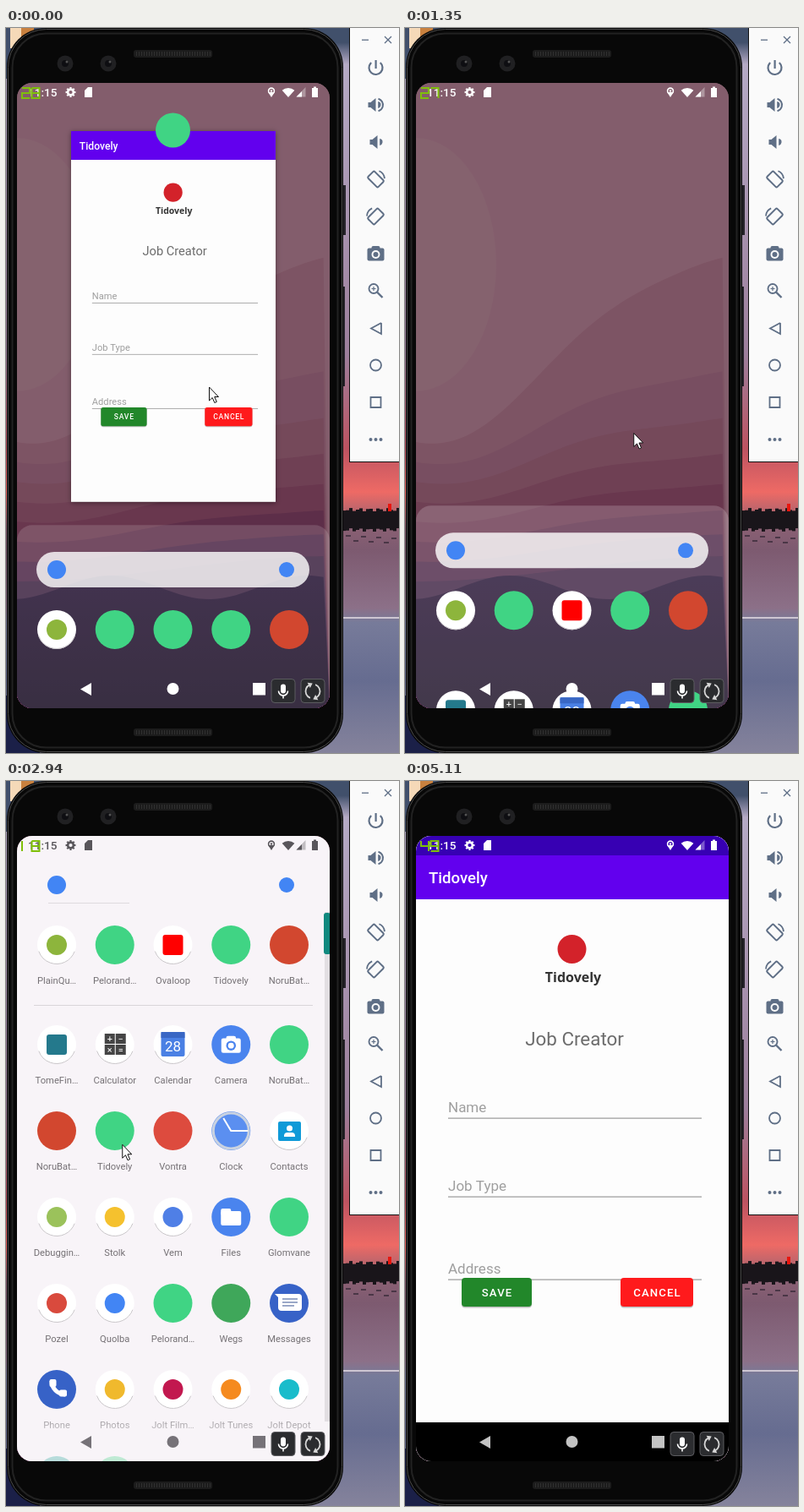
These frames come from a looping animation (465x858 px, 8 s). An HTML page with a canvas:

```html
<!DOCTYPE html>
<html lang="en">
<head>
<meta charset="utf-8">
<title>Phone emulator</title>
<style>
html, body { margin: 0; width: 465px; height: 858px; overflow: hidden; background: #000; }
canvas { display: block; }
</style>
</head>
<body>
<canvas id="stage" width="465" height="858"></canvas>
<script>
const c = document.getElementById('stage').getContext('2d');
const LOOP = 8000, TICK = 134.5;
const APP_NAME = 'Tidovely';
const GREEN = '#40d484', RED = '#d2472f', BLUE = '#4285f4', ROYAL = '#3762c7', WHITE = '#fff';

const clamp = v => Math.max(0, Math.min(1, v));
const mix = (a, b, p) => a + (b - a) * p;
const ramp = (t, from, to) => clamp((t - from) / (to - from));
const easeOut = u => 1 - (1 - u) ** 3;
const smooth = u => u * u * (3 - 2 * u);

// Drawing helpers
function rect(x, y, w, h, fill) { c.fillStyle = fill; c.fillRect(x, y, w, h); }
function round(x, y, w, h, r, fill, stroke, width = 1) {
  c.beginPath(); c.roundRect(x, y, w, h, r);
  if (fill) { c.fillStyle = fill; c.fill(); }
  if (stroke) { c.strokeStyle = stroke; c.lineWidth = width; c.stroke(); }
}
function disc(x, y, r, fill) { c.beginPath(); c.arc(x, y, r, 0, 7); c.fillStyle = fill; c.fill(); }
function ring(x, y, r, color, width, from = 0, to = 7) {
  c.beginPath(); c.arc(x, y, r, from, to); c.strokeStyle = color; c.lineWidth = width; c.stroke();
}
function poly(points, fill) { c.beginPath(); points.forEach(p => c.lineTo(...p)); c.closePath(); c.fillStyle = fill; c.fill(); }
function line(points, color, width) {
  c.beginPath(); points.forEach(p => c.lineTo(...p)); c.strokeStyle = color; c.lineWidth = width; c.stroke();
}
function text(s, x, y, size, fill, align = 'left', weight = 400, family = 'Roboto') {
  c.font = `${weight} ${size}px ${family}, sans-serif`;
  c.fillStyle = fill; c.textAlign = align; c.fillText(s, x, y);
}
function layer(alpha, draw) {
  if (alpha <= 0) return;
  c.save(); c.globalAlpha *= alpha; draw(); c.restore();
}
function place(x, y, angle, draw) { c.save(); c.translate(x, y); c.rotate(angle); draw(); c.restore(); }
function gradient(y0, y1, stops) {
  const g = c.createLinearGradient(0, y0, 0, y1);
  stops.forEach(([p, color]) => g.addColorStop(p, color));
  return g;
}

// Icons, drawn around the origin
const icons = {
  power(ink) { ring(0, 0, 8, ink, 2.2, -.85, Math.PI + .85); rect(-1, -9, 2.2, 10, ink); },
  speaker(ink, waves) {
    const left = waves > 1 ? -9 : -7;
    rect(left, -3, 5, 6, ink);
    poly([[left + 3, -3], [left + 9, -8], [left + 9, 8], [left + 3, 3]], ink);
    c.beginPath(); c.arc(left + 11, 0, 4, -1.4, 1.4); c.fillStyle = ink; c.fill();
    if (waves > 1) ring(left + 10, 0, 7.5, ink, 2, -1.3, 1.3);
  },
  rotate(ink, side) {
    place(0, 0, side * Math.PI / 4, () => {
      round(-5.5, -8.5, 11, 17, 1.5, null, ink, 2);
      ring(0, 0, 10.5, ink, 1.8, side < 0 ? -.4 : 2.4, side < 0 ? .7 : 3.5);
    });
  },
  camera(ink, hole) {
    round(-10, -6.5, 20, 15, 2, ink); round(-5, -9, 10, 5, 2, ink);
    disc(0, 1, 5, hole); disc(0, 1, 3, ink);
  },
  zoom(ink) {
    ring(-2.5, -2.5, 5.5, ink, 1.9); line([[1.500, 1.500], [8, 8]], ink, 2.4);
    line([[-5, -2.5], [0, -2.5]], ink, 1.2); line([[-2.5, -5], [-2.5, 0]], ink, 1.2);
  },
  handset() {
    ring(10, -10, 16, WHITE, 5, Math.PI / 2, Math.PI);
    round(-8.5, -12, 8, 9, 2, WHITE); round(3, .5, 9, 8, 2, WHITE);
  },
  chat() {
    round(-13, -11, 28, 20, 4, WHITE); poly([[-17, -11], [-8, -11], [-8, -2]], WHITE);
    for (let i = 0; i < 3; i++) rect(-8, -6 + 4 * i, i > 1 ? 14 : 18, 2, '#9aa8c8');
  },
  calculator() {
    [...'+−×='].forEach((s, i) => {
      const x = i % 2 * 13 - 12, y = (i >> 1) * 13 - 13;
      rect(x, y, 12, 12, '#454545'); text(s, x + 6, y + 10, 11, WHITE, 'center');
    });
  },
  calendar() {
    round(-14, -15, 28, 29, 2, '#4a80e4'); rect(-14, -15, 28, 7, '#3967c4');
    text('28', 0, 8, 17, WHITE, 'center');
  },
  photo() { c.scale(1.15, 1.15); icons.camera(WHITE, '#4a84ee'); },
  clock() { ring(0, 0, 21, '#c9d2e0', 3); line([[-9, -15], [0, 0], [20, 0]], WHITE, 2); },
  contacts() {
    round(-13, -11, 27, 23, 2, '#0f9ad8'); disc(.5, -3, 3.5, WHITE); round(-6, 2, 13, 5, [4, 4, 0, 0], WHITE);
  },
  folder() { round(-12, -10, 12, 8, 2, WHITE); round(-12, -7, 24, 17, 2, WHITE); },
  gear(ink) {
    ring(0, 0, 3.4, ink, 2.6);
    for (let a = 0; a < 6; a += Math.PI / 4) ring(0, 0, 5, ink, 2, a - .2, a + .2);
  },
  mic(ink) {
    round(-3, -8, 6, 11, 3, ink); ring(0, 0, 5.5, ink, 1.6, 0, Math.PI); rect(-.8, 5, 1.6, 4, ink);
  },
  pin(ink) { ring(0, -1.5, 3.4, ink, 1.6); poly([[-3.8, 0], [3.8, 0], [0, 6]], ink); disc(0, -1.5, 1.2, ink); },
  wifi(ink) { c.beginPath(); c.moveTo(0, 6); c.arc(0, 6, 11, -2.3, -.84); c.fillStyle = ink; c.fill(); }
};
const icon = (name, x, y, ...args) => place(x, y, 0, () => icons[name](...args));

const dot = color => () => disc(0, 0, 12, color);
const square = color => () => round(-12, -12, 24, 24, 3, color);
const APPS = [
  ['PlainQu…', WHITE, dot('#8db53c')], ['Pelorand…', GREEN], ['Ovaloop', WHITE, square('#f00')], [APP_NAME, GREEN], ['NoruBat…', RED],
  ['TomeFin…', WHITE, square('#24798c')], ['Calculator', WHITE, icons.calculator], ['Calendar', WHITE, icons.calendar], ['Camera', '#4a84ee', icons.photo], ['NoruBat…', GREEN],
  ['NoruBat…', RED], [APP_NAME, GREEN], ['Vontra', '#dd4b3e'], ['Clock', '#5b8ff0', icons.clock], ['Contacts', WHITE, icons.contacts],
  ['Debuggin…', WHITE, dot('#9bc25b')], ['Stolk', WHITE, dot('#f5c12e')], ['Vem', WHITE, dot('#4f7fe6')], ['Files', '#4a84ee', icons.folder], ['Glomvane', GREEN],
  ['Pozel', WHITE, dot('#d94a3d')], ['Quolba', WHITE, dot(BLUE)], ['Pelorand…', GREEN], ['Wegs', '#3fa75a'], ['Messages', ROYAL, icons.chat],
  ['Phone', ROYAL, icons.handset], ['Photos', WHITE, dot('#f0b92d')], ['Jolt Film…', WHITE, dot('#c2184f')], ['Jolt Tunes', WHITE, dot('#f58a1f')], ['Jolt Depot', WHITE, dot('#19bccb')],
  ['', '#26a69a'], ['', GREEN]
];
const named = name => APPS.find(app => app[0] === name);
const SUGGESTED = [APPS[0], APPS[1], APPS[3], APPS[3], APPS[4]];
const HOME_DOCK = ['Phone', 'Messages', 'Jolt Depot', 'Vontra'].map(named);

const column = i => 60 + 68.75 * (i % 5);
function appIcon([, color, mark], x, y) {
  disc(x, y, 23, color);
  if (color === WHITE) ring(x, y, 22.5, '#c9c5c9', 1, .35, 2.8);
  if (mark) place(x, y, 0, mark);
}
function searchMarks(y) { disc(60, y, 11, BLUE); disc(332, y, 9, BLUE); }

function backdrop() {
  rect(0, 0, 465, 858, gradient(0, 858, [[0, '#41506b'], [.02, '#41506b'], [.05, '#b5aac5'], [.45, '#9d7f9c'], [.58, '#bd5361'],
    [.64, '#ee6a65'], [.69, '#8a6073'], [.72, '#7d5a70'], [.8, '#8c7088'], [.82, '#777b9a'], [.9, '#666c90'], [1, '#85839c']]));
  rect(398, 697, 67, 2, '#cdc6d2');
  rect(0, 0, 40, 60, '#41506b'); rect(5, 0, 13, 24, '#f5d9b8'); rect(18, 0, 15, 12, '#c9813f');
  rect(0, 790, 40, 68, '#1b2048');
  for (let x = 398; x < 465; x += 4) rect(x, 570 + 2 * Math.sin(x * 7.3), 4, 24, '#19151a');
  for (let i = 0; i < 7; i++) rect(402 + i * 9, 600 + i * 17 % 11, 6, 2, '#4a3646');
  rect(452, 563, 4, 9, '#e8160e');
}

function device() {
  rect(398, 186, 4, 59, '#252329'); rect(398, 306, 3, 118, '#252329');
  round(1, 0, 398, 858, 46, '#080808');
  round(2.5, 1.5, 395, 855, 45, null, '#4a4a4a');
  round(7.5, 6.5, 385, 845, 40, null, '#222', 2);
  for (const y of [26, 829]) {
    round(151, y, 93, 9, 3, '#1c1c1c');
    for (let x = 154; x < 242; x += 3) rect(x, y + 2, 1, 5, '#303030');
  }
  for (const x of [70, 121]) { disc(x, 42, 9.5, '#202022'); disc(x, 42, 4, '#0e0e12'); disc(x + 2, 40, 1.5, '#555'); }
}

function toolbar() {
  const ink = '#5f6f86', x = 437.5, row = i => 47 + 44 * i;
  rect(406, 0, 59, 514, '#111'); rect(407, 0, 58, 513, '#fafafa');
  rect(421, 13.5, 8, 1.3, ink);
  for (const s of [-4, 4]) line([[452 - s, 10], [452 + s, 18]], ink, 1.3);
  icon('power', x, row(0), ink);
  icon('speaker', x, row(1), ink, 2); icon('speaker', x, row(2), ink, 1);
  icon('rotate', x, row(3), ink, -1); icon('rotate', x, row(4), ink, 1);
  icon('camera', x, row(5), ink, '#fafafa'); icon('zoom', x, row(6), ink);
  line([[444, 349], [444, 362], [432, 355.5], [444, 349]], ink, 1.8);
  ring(x, row(8), 6.5, ink, 1.8);
  round(431.5, 437, 12, 12, 0, null, ink, 1.8);
  for (const d of [-6, 0, 6]) disc(x + d, row(10), 2, ink);
}

function hill(color, height) {
  c.beginPath(); c.moveTo(13, 805);
  for (let u = 0; u <= 1; u += .02) c.lineTo(13 + 370 * u, height(u));
  c.lineTo(383, 805); c.fillStyle = color; c.fill();
}
function wallpaper() {
  rect(13, 65, 370, 740, '#f4a7c5');
  c.beginPath(); c.ellipse(13, 280, 95, 150, 0, 0, 7); c.fillStyle = '#f7b1ca'; c.fill();
  const shades = ['#e896b5', '#de8ab0', '#d87ea2', '#cc6c96', '#bf5a8a', '#a7497e', '#85397a', '#65306f'];
  shades.forEach((shade, i) => {
    const p = i / (shades.length - 1);
    hill(shade, u => mix(490 + 165 * p, 267 + 358 * Math.sqrt(p), smooth(u)) + 8 * (1 - p) * Math.sin(9 * u));
  });
  hill(gradient(655, 805, [[0, '#310c4e'], [1, '#1b0430']]), u => 662 - 14 * Math.cos(10 * (u - .3)));
}

function home() {
  rect(13, 65, 370, 73, 'rgba(180,150,185,.3)');
  rect(13, 65, 370, 40, gradient(65, 105, [[0, 'rgba(40,25,40,.45)'], [1, 'rgba(40,25,40,0)']]));
  c.save(); c.shadowColor = 'rgba(0,0,0,.45)'; c.shadowBlur = 4; c.shadowOffsetY = 1;
  text('Sunday, Mar 28', 197.5, 155, 22.4, WHITE, 'center'); c.restore();
  HOME_DOCK.forEach((app, i) => appIcon(app, column(i), 651));
  round(36, 710, 323, 42, 21, '#d3cdd8');
  searchMarks(731);
}

// App drawer; `off` is its distance below the fully open position.
function sheet(off, apps) {
  const open = clamp(1 - off / 400);
  layer(clamp(1.15 - off / 518), () => round(13, 62 + off * 1.016, 370, 900, 18, '#f8f4f8'));
  if (off > 60) layer(.8 * clamp(off / 450), () => round(36, 102 + off, 323, 42, 21, WHITE));
  searchMarks(123 + off);
  apps.forEach((app, i) => {
    const row = Math.floor(i / 5), x = column(i), y = off + (row ? 210 + 102 * row : 194);
    appIcon(app, x, y);
    layer(open, () => text(app[0], x, y + 46, 11.2, '#757175', 'center'));
  });
  if (off < 40) {
    rect(33, 265 + off, 330, 1, '#d9d5d9'); rect(50, 144 + off, 96, 1, '#dedade');
    rect(13, 740, 370, 65, gradient(740, 805, [[0, 'rgba(248,244,248,0)'], [.45, 'rgba(248,244,248,.6)'], [1, 'rgba(248,244,248,.7)']]));
  }
  layer(open, () => { rect(377, 155 + off, 6, 603, '#e2dee2'); round(376, 156 + off, 8, 49, 3, '#11897f'); });
}

function field(label, y) { text(label, 51, y - 7, 17, '#9f9f9f'); rect(51, y - .5, 300, 1.2, '#999'); }
function button(label, x, w, color) {
  round(x, 589.5, w, 34, 4, 'rgba(0,0,0,.25)'); round(x, 588, w, 34, 4, color);
  c.letterSpacing = '1.1px'; text(label, x + w / 2 + .5, 610, 13.2, WHITE, 'center', 500); c.letterSpacing = '0px';
}
function jobApp(loaded) {
  rect(13, 65, 370, 740, '#fdfdfd');
  rect(13, 65, 370, 23, '#3700b3'); rect(13, 759, 370, 46, '#000');
  if (!loaded) return;
  rect(13, 88, 370, 52, '#6200ee');
  text(APP_NAME, 28, 121, 18.6, WHITE, 'left', 500);
  disc(197.5, 199, 17, '#d3222a');
  text(APP_NAME, 199, 238, 16, '#333', 'center', 700, '"Open Sans"');
  text('Job Creator', 200.5, 313, 22.4, '#6c6c6c', 'center');
  field('Name', 399); field('Job Type', 492); field('Address', 590);
  button('SAVE', 67, 83, '#22872a'); button('CANCEL', 255, 86, '#ff1a1c');
}

function recentCard(dy) {
  const scale = .654;
  c.save(); c.translate(0, dy);
  c.save(); c.shadowColor = 'rgba(0,0,0,.4)'; c.shadowBlur = 6; c.shadowOffsetY = 1;
  rect(77, 122, 370 * scale, 671 * scale, WHITE); c.restore();
  c.save(); c.translate(77 - 13 * scale, 122 - 88 * scale); c.scale(scale, scale);
  c.beginPath(); c.rect(13, 88, 370, 671); c.clip();
  jobApp(true); c.restore();
  disc(197.5, 121, 20.5, GREEN); c.restore();
}

function statusBar(ink) {
  text('11:15', 26, 81, 13.6, ink, 'left', 500);
  icon('gear', 76.5, 76, ink); icon('pin', 314, 76, ink); icon('wifi', 334, 76, ink);
  poly([[93, 74], [97, 70], [102, 70], [102, 82], [93, 82]], ink);
  layer(.35, () => poly([[343.5, 81.500], [354.5, 81.500], [354.5, 70]], ink));
  poly([[343.5, 81.500], [350, 81.500], [350, 75]], ink);
  rect(362, 71, 7, 11, ink); rect(364, 69.5, 3, 2, ink);
}

// Each digit is one stroke through a grid of 2 by 3 points.
const DIGITS = { 1: '04', 2: '013245', 4: '02315', 7: '015', 8: '0154023', 9: '320154' };
function fpsCounter(t) {
  const value = t < 1300 ? '28' : t < 2900 ? '27' : t < 4000 ? '18' : t < 4900 ? '48' : '49';
  [...value].forEach((d, i) =>
    line([...DIGITS[d]].map(n => [19 + 11.5 * i + n % 2 * 9, 71 + (n >> 1) * 6]), '#7fbf0a', 2));
}

function navigation(ink) {
  poly([[101, 775], [101, 790], [88, 782.5]], ink);
  disc(197.5, 782, 7, ink); rect(292, 775, 15, 14.5, ink);
  for (const x of [314, 349]) round(x, 770.5, 28, 28, 4, '#2b2c2f', '#5c5c60');
  icon('mic', 328, 784.5, WHITE);
  for (const a of [1.1, 1.1 + Math.PI]) place(363, 785, a, () => {
    ring(0, 0, 8.5, '#d5d5d5', 1.8, -2.3, 0);
    poly([[5, -1], [12, -1], [8.5, 4]], '#d5d5d5');
  });
}

function screen(t) {
  const inOverview = t < 1000, inApp = t >= 3600;
  const off = inOverview ? mix(518, 760, ramp(t, 410, 660)) : 760 * (1 - easeOut(ramp(t, 1266, 1860)));
  const homeShown = clamp((off - 519) / 241);
  const dismissed = ramp(t, 0, 260), launch = easeOut(ramp(t, 3280, 3690));
  const grow = (from, to) => mix(from, to, launch);
  c.save();
  c.beginPath(); c.roundRect(13, 65, 370, 740, 18); c.clip();
  wallpaper();
  layer(.5 * (1 - homeShown), () => rect(13, 65, 370, 740, '#141414'));
  layer(homeShown, home);
  layer(1 - homeShown, () => sheet(off, inOverview ? SUGGESTED : APPS));
  layer(1 - dismissed, () => recentCard(-460 * dismissed));
  if (t > 3200) disc(128.75, 414, 23, 'rgba(0,0,0,.15)');
  if (launch > 0) {
    c.save(); c.beginPath();
    c.roundRect(grow(106, 13), grow(391, 65), grow(46, 370), grow(46, 740), grow(23, 0));
    c.clip(); jobApp(t >= 4000); c.restore();
  }
  const light = mix(255, 195, ramp(t, 4400, 5100)), onSheet = off < 10 && !inApp;
  statusBar(onSheet ? '#59565b' : WHITE);
  navigation(onSheet ? '#767278' : `rgb(${light},${light},${light})`);
  c.restore();
  fpsCounter(t);
}

// Resting and turning points of the mouse: time, x, y
const STOPS = [[0, 240, 425], [400, 173, 696], [670, 101, 794], [810, 146, 813], [1200, 289, 651], [1610, 236, 166],
  [2010, 79, 240], [2520, 140, 393], [2950, 134, 430], [3220, 232, 438], [3630, 272, 440], [4040, 272, 440], [4300, 436, 519]];
function pointer(t) {
  const next = STOPS.findIndex(s => s[0] > t), b = STOPS.at(next), a = next > 0 ? STOPS[next - 1] : b;
  const p = ramp(t, a[0], b[0]);
  c.save(); c.translate(mix(a[1], b[1], p) + .5, mix(a[2], b[2], p));
  c.beginPath();
  c.lineTo(0, 0); c.lineTo(0, 16); c.lineTo(3.7, 12.5); c.lineTo(6.3, 18.5);
  c.lineTo(8.8, 17.4); c.lineTo(6.2, 11.5); c.lineTo(11, 11.5); c.closePath();
  c.fillStyle = WHITE; c.fill();
  c.strokeStyle = '#111'; c.lineWidth = 1; c.stroke();
  c.restore();
}

function frame() {
  const t = TICK * Math.floor((performance.now() % LOOP + 25) / TICK);
  backdrop();
  device();
  toolbar();
  screen(t);
  if (t < 4400) pointer(t);
  requestAnimationFrame(frame);
}
frame();
</script>
</body>
</html>
```
